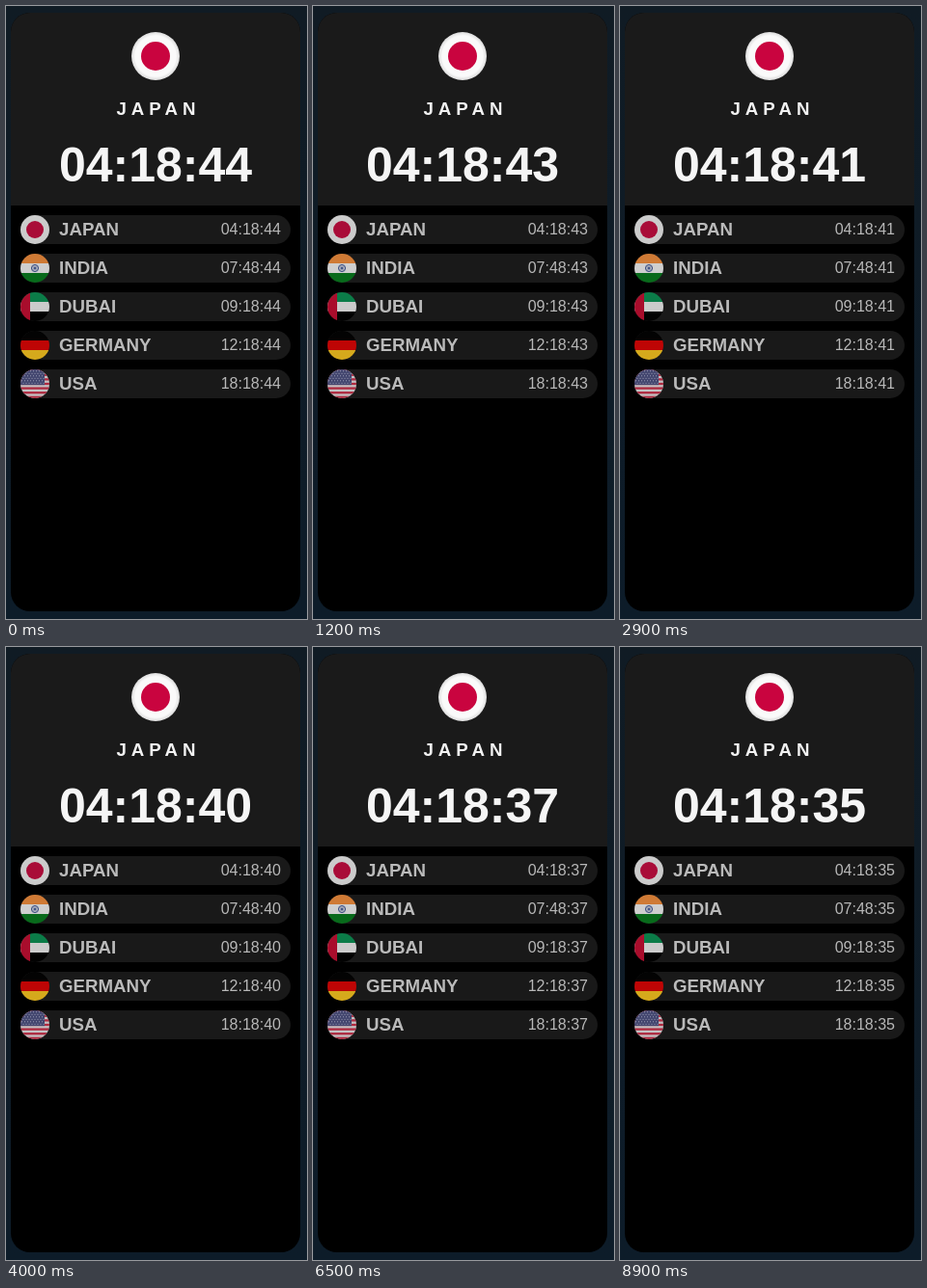
An HTML page that plays this animation: 312x636 px, repeating every 9000 ms.

```html
<!DOCTYPE html>
<html lang="en">
<head>
<meta charset="utf-8">
<title>World clock</title>
<style>
  html, body { margin: 0; width: 100%; height: 100%; overflow: hidden; background: #0f1c27; }
  svg { display: block; width: 312px; height: 636px; }
  text { font-family: "Liberation Sans", Arial, sans-serif; }
  .name { font-size: 18.72px; font-weight: 700; }
  .small { font-size: 16px; text-anchor: end; }
  .big { font-size: 50px; font-weight: 700; text-anchor: middle; }
</style>
</head>
<body>
<svg viewBox="0 0 312 636">
  <defs>
    <clipPath id="card"><rect x="5" y="7" width="300" height="621" rx="20"/></clipPath>
    <clipPath id="disc"><circle cx="15" cy="15" r="15"/></clipPath>
    <linearGradient id="back" x2="0" y2="1">
      <stop offset="0" stop-color="#101b24"/>
      <stop offset="1" stop-color="#0d1c29"/>
    </linearGradient>
    <radialGradient id="cloth">
      <stop offset=".84" stop-color="#fafafa"/>
      <stop offset="1" stop-color="#dcdcdc"/>
    </radialGradient>
  </defs>
  <rect width="312" height="636" fill="url(#back)"/>
  <g clip-path="url(#card)">
    <rect x="5" y="7" width="300" height="621" fill="#000"/>
    <rect x="5" y="7" width="300" height="200" fill="#1a1a1a"/>
  </g>
  <circle cx="155" cy="52" r="25" fill="url(#cloth)"/>
  <circle cx="155" cy="52" r="15" fill="#c9043f"/>
  <text class="name" x="114.4" y="113" letter-spacing="5" fill="#f2f2f2">JAPAN</text>
  <text class="big" id="main" x="155" y="182" fill="#f5f5f5"></text>
  <g id="rows"></g>
</svg>
<script>
const rect = (x, y, w, h, fill) =>
  `<rect x="${x}" y="${y}" width="${w}" height="${h}" fill="${fill}"/>`;
const dot = (x, y, r, fill) => `<circle cx="${x}" cy="${y}" r="${r}" fill="${fill}"/>`;
const bands = (...fills) =>
  fills.map((fill, i) => rect(0, i * 10, 30, 10, fill)).join('');

function wheel() {
  let spokes = '';
  for (let a = 0; a < 180; a += 30) {
    spokes += `<path d="M11.5 15h7" transform="rotate(${a} 15 15)"/>`;
  }
  return `<g fill="none" stroke="#3d4f82"><circle cx="15" cy="15" r="3.6"/>` +
    `<g stroke-width=".4">${spokes}</g></g>` + dot(15, 15, 1, '#3d4f82');
}

function starsAndStripes() {
  let out = rect(0, 0, 30, 30, '#c4c0c2');
  for (let i = 0; i < 7; i++) out += rect(0, i * 30 / 6.5, 30, 30 / 13, '#ae2a40');
  out += rect(0, 0, 25, 16.15, '#43466f');
  for (let r = 0; r < 6; r++) {
    for (let c = 0; c < 8; c++) {
      out += dot(1.5 + c * 3 + (r % 2) * 1.5, 1.8 + r * 2.5, .55, '#a9abc0');
    }
  }
  return out;
}

const places = [
  ['JAPAN', 4, 18, rect(0, 0, 30, 30, '#cbcbcb') + dot(15, 15, 9, '#a90c38')],
  ['INDIA', 7, 48, bands('#cf7a35', '#cfcfcf', '#086a1b') + wheel()],
  ['DUBAI', 9, 18, bands('#0b7c48', '#cbcbcb', '#020202') + rect(0, 0, 10, 30, '#a90d2c')],
  ['GERMANY', 12, 18, bands('#030303', '#be0505', '#d5a91c')],
  ['USA', 18, 18, starsAndStripes()]
];

document.getElementById('rows').innerHTML = places.map(([name, , , flag], i) =>
  `<g transform="translate(15 ${217 + i * 40})">
    <rect width="280" height="30" rx="15" fill="#191919"/>
    <g clip-path="url(#disc)">${flag}</g>
    <text class="name" x="40" y="21" fill="#bababa">${name}</text>
    <text class="small" x="270" y="20" fill="#b8b8b8"></text>
  </g>`).join('');

const main = document.getElementById('main');
const clocks = document.querySelectorAll('.small');
const two = n => String(n).padStart(2, '0');
const LOOP = 9000;
let start = null, shown = null;

function draw(t) {
  const sec = 44 - Math.floor((t % LOOP + 500) / 1000);
  if (sec === shown) return;
  shown = sec;
  const times = places.map(([, h, m]) => [h, m, sec].map(two).join(':'));
  main.textContent = times[0];
  clocks.forEach((el, i) => { el.textContent = times[i]; });
}

function tick(now) {
  if (start === null) start = now;
  draw(now - start);
  requestAnimationFrame(tick);
}
draw(0);
requestAnimationFrame(tick);
</script>
</body>
</html>
```
